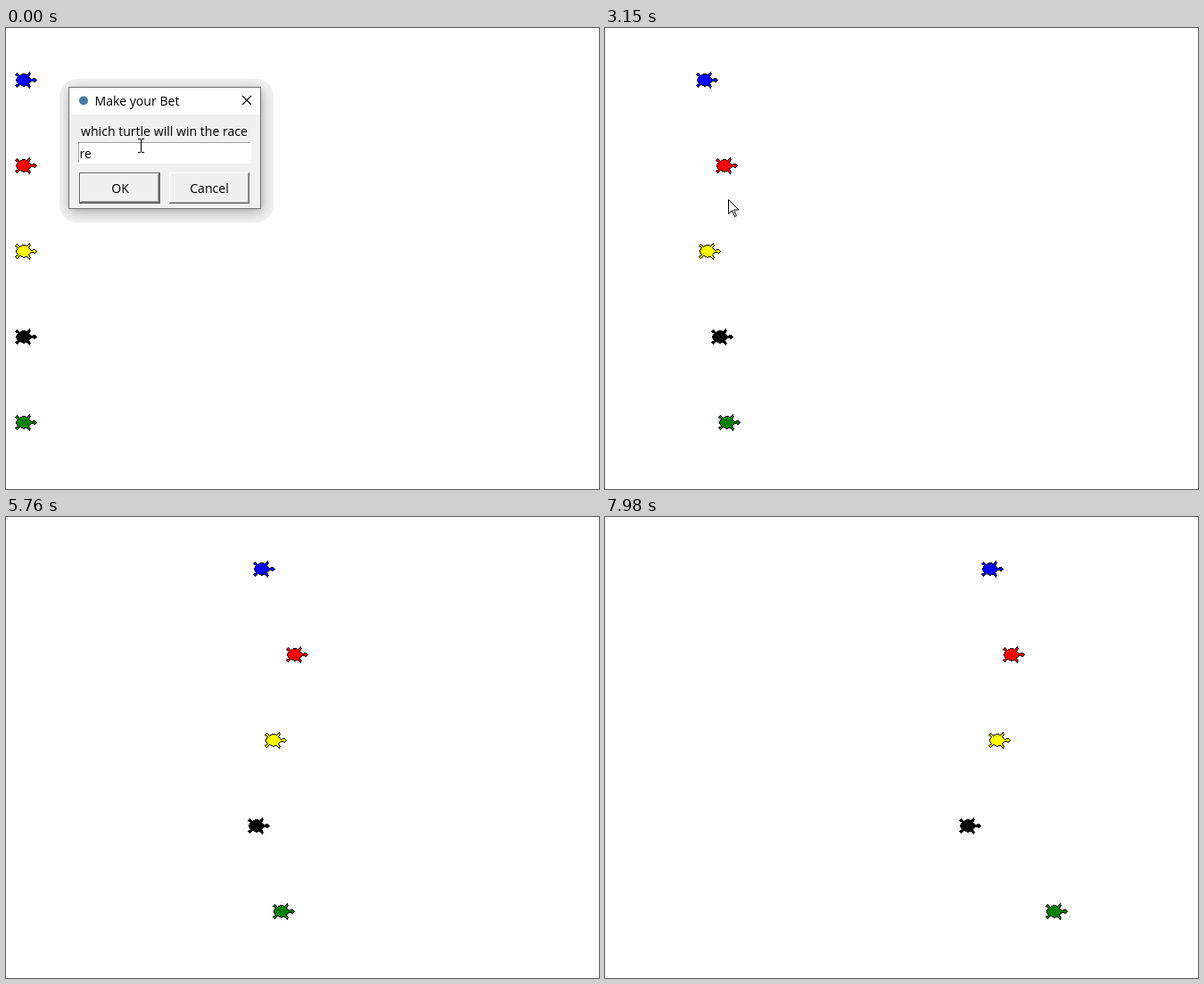
Animation, 665 px wide and 517 px high, one loop 8 s. Source, as an HTML page with a canvas:

```html
<!DOCTYPE html>
<html lang="en">
<head>
<meta charset="utf-8">
<title>Turtle race</title>
<style>
  html, body { margin: 0; width: 100%; height: 100%; overflow: hidden; background: #fefefe; }
  canvas { display: block; }
</style>
</head>
<body>
<canvas id="stage" width="665" height="517"></canvas>
<script>
const ctx = document.getElementById('stage').getContext('2d');
const LOOP = 8000;
const HOP = 150;
const START = 20;
const PAPER = '#fefefe';
const FONT = '14.1px "Open Sans", "Noto Sans", sans-serif';

// Checkpoints of the race; between them everything advances in even hops.
const CLOCK = [1010, 1480, 1630, 3150, 4170, 5760, 6650, 7980];
const RACERS = [
  ['#0000ff', 29, 112, 183, 287, 341, 432],
  ['#ff0000', 29, 134, 200, 324, 369, 456],
  ['#ffff00', 22, 115, 184, 300, 355, 440],
  ['#000000', 26, 129, 186, 281, 346, 407],
  ['#008000', 20, 137, 212, 309, 397, 504]
].map(([color, ...stops], i) => ({
  xs: [START, START, ...stops],
  y: 58 + 96 * i,
  sprite: makeTurtle(color)
}));

const MOUSE = {
  t: [1010, 1320, 1630, 1930, 3150, 3600],
  x: [151, 131, 131, 138, 138, 357],
  y: [131, 187, 187, 192, 192, 192]
};

// Index of the leg that contains t, or -1 outside the list.
const legAt = (times, t) => times.findIndex((a, i) => a <= t && t < times[i + 1]);

function snap(t) {
  const i = legAt(CLOCK, t);
  if (i < 0) return t;
  const span = CLOCK[i + 1] - CLOCK[i];
  const hop = span / Math.round(span / HOP);
  return CLOCK[i] + Math.floor((t - CLOCK[i]) / hop) * hop;
}

function track(times, values, t) {
  const i = legAt(times, t);
  if (i < 0) return t < times[0] ? values[0] : values.at(-1);
  const k = (t - times[i]) / (times[i + 1] - times[i]);
  return Math.round(values[i] + k * (values[i + 1] - values[i]));
}

// Hard-edged turtle facing right: one half is given, the other mirrored.
function makeTurtle(color) {
  const half = [[16, 0], [14, 2], [10, 1], [7, 4], [9, 7], [8, 9], [5, 6], [1, 7], [-3, 5], [-6, 8], [-8, 6], [-5, 4], [-7, 0]];
  const mirror = half.slice(1, -1).reverse().map(([x, y]) => [x, -y]);
  const pts = half.concat(mirror).map(([x, y]) => [x + 8, y + 9]);
  const sprite = document.createElement('canvas');
  sprite.width = 25;
  sprite.height = 19;
  const g = sprite.getContext('2d');
  const shape = new Path2D();
  pts.forEach(([x, y]) => shape.lineTo(x, y));
  shape.closePath();

  g.fillStyle = color;
  for (let y = 0; y < 19; y++) {
    for (let x = 0; x < 25; x++) if (g.isPointInPath(shape, x, y)) g.fillRect(x, y, 1, 1);
  }
  const round = v => Math.ceil(v - 0.5);
  g.fillStyle = '#000';
  pts.forEach(([x, y], i) => {
    const [x2, y2] = pts[(i + 1) % pts.length];
    const n = Math.max(Math.abs(x2 - x), Math.abs(y2 - y));
    for (let s = 0; s <= n; s++) {
      g.fillRect(round(x + (x2 - x) * s / n), round(y + (y2 - y) * s / n), 1, 1);
    }
  });
  return sprite;
}

function rect(x, y, w, h, color) {
  ctx.fillStyle = color;
  ctx.fillRect(x, y, w, h);
}

function bevel(x, y, w, h, light, dark) {
  rect(x, y, w, 1, light);
  rect(x, y, 1, h, light);
  rect(x, y + h - 1, w, 1, dark);
  rect(x + w - 1, y, 1, h, dark);
}

function text(str, x, y, align = 'left') {
  ctx.fillStyle = '#000';
  ctx.font = FONT;
  ctx.textAlign = align;
  ctx.fillText(str, x, y);
}

function closeMark(x, y, r) {
  ctx.strokeStyle = '#000';
  ctx.lineWidth = 1.1;
  ctx.beginPath();
  for (const s of [-1, 1]) {
    ctx.moveTo(x - r, y - r * s);
    ctx.lineTo(x + r, y + r * s);
  }
  ctx.stroke();
}

function shadow(inset) {
  ctx.save();
  ctx.beginPath();
  ctx.roundRect(60 + inset, 57 + inset, 240 - 2 * inset, 161 - 2 * inset, 20);
  ctx.fillStyle = '#efefef';
  ctx.fill();
  ctx.clip();
  ctx.shadowColor = 'rgba(0,0,0,0.35)';
  ctx.shadowBlur = 12;
  ctx.shadowOffsetX = 1;
  ctx.shadowOffsetY = 3;
  rect(71, 67, 214, 135, '#f0f0f0');
  ctx.restore();
}

function dialog(entry, caret, pressed, fading) {
  ctx.save();
  if (fading) {
    ctx.translate(178, 134.5);
    ctx.scale(0.98, 0.98);
    ctx.translate(-178, -134.5);
  }
  shadow(fading ? 4 : 0);
  rect(70, 66, 216, 137, '#707070');
  rect(71, 67, 214, 30, '#fff');
  rect(71, 97, 214, 105, '#f0f0f0');

  ctx.fillStyle = '#4b7ba6';
  ctx.beginPath();
  ctx.arc(87, 81.5, 5, 0, Math.PI * 2);
  ctx.fill();
  text('Make your Bet', 99.5, 87);
  if (!fading) closeMark(270, 81, 5);

  text('which turtle will win the race', 84, 121);
  rect(81, 128, 194, 24, '#fff');
  bevel(81, 128, 194, 24, '#a0a0a0', '#fff');
  text(entry, 82.5, 146);
  if (caret) rect(104, 130, 2, 20, '#000');

  const sides = ['#fff', '#696969'], inner = ['#f0f0f0', '#a0a0a0'];
  bevel(183, 162, 90, 35, ...sides);
  bevel(184, 163, 88, 33, ...inner);
  text('Cancel', 228, 185, 'center');

  const push = pressed ? 1 : 0;
  if (pressed) [sides, inner].forEach(pair => pair.reverse());
  bevel(82, 162, 91, 35, '#646464', '#646464');
  bevel(83, 163, 89, 33, ...sides);
  bevel(84, 164, 87, 31, ...inner);
  text('OK', 128 + push, 185 + push, 'center');
  ctx.restore();

  // Veil the finished window as a whole.
  if (fading) {
    ctx.globalAlpha = 0.5;
    rect(60, 50, 245, 172, PAPER);
    ctx.globalAlpha = 1;
  }
}

function beam(x, y) {
  rect(x, y - 6, 1, 14, '#000');
  for (const row of [y - 7, y + 8]) {
    rect(x - 3, row, 3, 1, '#000');
    rect(x + 1, row, 3, 1, '#000');
  }
}

function arrow(x, y) {
  const pts = [[0, 0], [0, 16], [4, 12], [7, 19], [9, 18], [6, 11.5], [11.5, 11.5]];
  ctx.beginPath();
  pts.forEach(([dx, dy]) => ctx.lineTo(x + 0.5 + dx, y + 0.5 + dy));
  ctx.closePath();
  ctx.fillStyle = '#fff';
  ctx.fill();
  ctx.strokeStyle = '#000';
  ctx.lineWidth = 1;
  ctx.stroke();
}

function draw(time) {
  const t = snap(time);
  rect(0, 0, 665, 517, PAPER);
  if (t < 1780) {
    const caret = t >= 120 && (t < 700 || t >= 1010);
    dialog(t < 120 ? 're' : 'red', caret, t >= 1480, t >= 1630);
  }
  for (const { xs, y, sprite } of RACERS) {
    ctx.drawImage(sprite, track(CLOCK, xs, t) - 10, y - 9);
  }
  if (t < MOUSE.t.at(-1)) {
    const x = track(MOUSE.t, MOUSE.x, t);
    const y = track(MOUSE.t, MOUSE.y, t);
    (y < 152 ? beam : arrow)(x, y);
  }
}

const begin = performance.now();
function loop() {
  draw((performance.now() - begin) % LOOP);
  requestAnimationFrame(loop);
}
loop();
</script>
</body>
</html>
```
